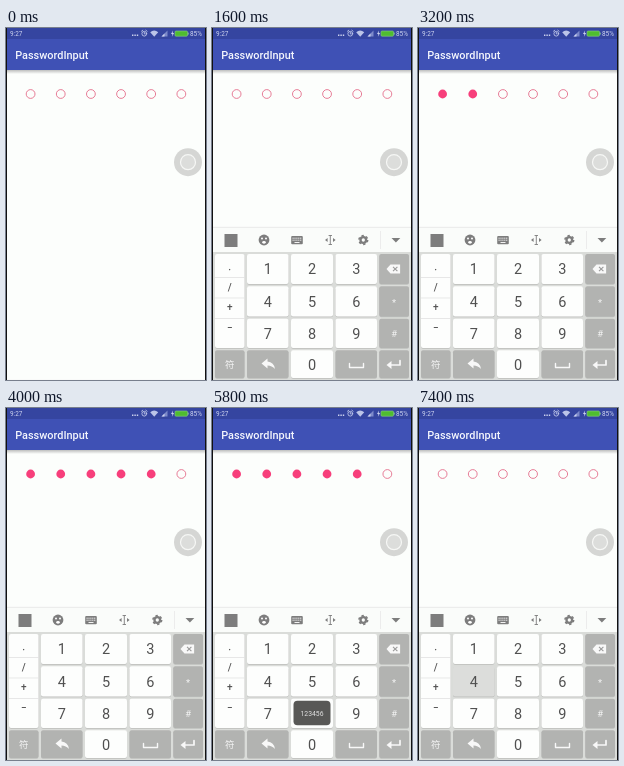
An HTML page that plays this animation: 200x352 px, repeating every 8000 ms.

```html
<!DOCTYPE html>
<html lang="en">
<head>
<meta charset="utf-8">
<title>PasswordInput</title>
<style>
  html, body { margin: 0; width: 100%; height: 100%; overflow: hidden; background: #fcfefc; }
  svg { display: block; width: 100%; height: 100%; }
  text { font-family: Roboto, "Noto Sans CJK SC", "Noto Sans CJK", sans-serif; }
  .digit { font-size: 14.5px; fill: #505050; text-anchor: middle; }
  .sign { font-size: 10px; font-weight: 500; fill: #555; text-anchor: middle; }
  .light { fill: #f4f4f4; text-anchor: middle; font-size: 9.5px; }
  .status { font-size: 6.4px; fill: #ccd2ee; }
  .line { fill: none; stroke-linecap: round; stroke-linejoin: round; }
</style>
</head>
<body>
<svg viewBox="0 0 200 352" preserveAspectRatio="none">
  <defs>
    <linearGradient id="shade" x2="0" y2="1">
      <stop stop-color="#000" stop-opacity=".25"/>
      <stop offset="1" stop-color="#000" stop-opacity="0"/>
    </linearGradient>
  </defs>
  <rect width="200" height="352" fill="#fcfefc"/>
  <rect y="42" width="200" height="4" fill="url(#shade)"/>
  <rect width="200" height="42" fill="#3f51b5"/>
  <rect width="200" height="11" fill="#3545a0"/>
  <text x="9.2" y="30.8" font-size="10.9" font-weight="500" fill="#f4f6fd">PasswordInput</text>

  <g id="status">
    <text class="status" x="4" y="8">9:27</text>
    <text class="status" x="184" y="8">85%</text>
    <path d="M126 7.3h1.4M128.4 7.3h1.4M130.8 7.3h1.4" stroke="#ccd2ee" stroke-width="1.4"/>
    <g class="line" stroke="#bcc5e8" stroke-width=".9">
      <circle cx="138.3" cy="5.7" r="2.4"/>
      <path d="M138.3 4.4v1.5h1M135.5 3.2l1.3-1M141.1 3.2l-1.3-1"/>
    </g>
    <path d="M144.2 4.3q4-3.4 8 0l-4 4.5z" fill="#bcc5e8"/>
    <path d="M161.5 2.5v6h-6z" fill="#7d8aca"/>
    <path d="M158.5 5.5v3h-3z" fill="#ccd2ee"/>
    <path d="M167 2.4l-2 3.5h1.4l-.5 2.8 2.2-3.7h-1.4z" fill="#ccd2ee"/>
    <rect x="169" y="3" width="12.5" height="5.2" rx="1" fill="#4fbd2f" stroke="#8cc98a" stroke-width=".6"/>
    <rect x="181.7" y="4.6" width="1" height="2" fill="#8cc98a"/>
  </g>

  <g id="dots" stroke-width=".9"></g>

  <g id="keyboard">
    <rect y="199" width="200" height="153" fill="#dadcd9"/>
    <rect y="199" width="200" height="25" fill="#fafcfa"/>
    <path d="M0 199.3h200" stroke="#e2e2e2" stroke-width=".7"/>
    <rect x="12.5" y="206" width="13" height="13" fill="#7d7d7d"/>
    <circle cx="52" cy="212" r="5.4" fill="#7d7d7d"/>
    <circle cx="50" cy="210.4" r="1" fill="#fff"/>
    <circle cx="54" cy="210.4" r="1" fill="#fff"/>
    <ellipse cx="52" cy="214.3" rx="1.8" ry="1.4" fill="#fff"/>
    <rect x="79.2" y="208" width="11.6" height="8.2" rx="1" fill="#7d7d7d"/>
    <path d="M80.5 210.2h9M80.5 212.2h9" stroke="#fff" stroke-width=".9" stroke-dasharray="1.2 .7"/>
    <path d="M82.5 214.5h5" stroke="#fff" stroke-width=".9"/>
    <path class="line" d="M118.3 207.7v8.6M117 207.5h2.600M117 216.500h2.600" stroke="#7d7d7d" stroke-width=".9"/>
    <path d="M115.6 210v4l-2.600-2zM121 210v4l2.600-2z" fill="#7d7d7d"/>
    <circle cx="151.3" cy="212" r="4.4" fill="none" stroke="#7d7d7d" stroke-width="1.5" stroke-dasharray="2.3 2.308"/>
    <circle cx="151.3" cy="212" r="2.8" fill="none" stroke="#7d7d7d" stroke-width="2.3"/>
    <path d="M168.5 203v18" stroke="#e6e6e6" stroke-width=".7"/>
    <path d="M179.5 210h8.800l-4.400 4.500z" fill="#7d7d7d"/>
    <g id="keys"></g>
  </g>

  <g id="toast">
    <rect x="81.500" y="292.700" width="37" height="24.600" rx="4" fill="#585856"/>
    <text x="100" y="307.500" font-size="6.8" fill="#e2e2e2" text-anchor="middle">123456</text>
  </g>

  <circle cx="182" cy="134.200" r="14" fill="#d5d6d4"/>
  <circle cx="182" cy="134.200" r="7.500" fill="#dcdddb" stroke="#f6f7f5" stroke-width="1.2"/>
  <path d="M.5 0v352M199.5 0v352" stroke="#111"/>
</svg>
<script>
const LOOP = 8000;
const byId = id => document.getElementById(id);

function add(parent, tag, attrs, text = '') {
  const node = document.createElementNS('http://www.w3.org/2000/svg', tag);
  for (const name in attrs) node.setAttribute(name, attrs[name]);
  node.textContent = text;
  return parent.appendChild(node);
}

// Keys: left and right edges per column, top and bottom edges per row
const columns = [[3, 32.5], [35, 76.5], [79, 121], [123.5, 165], [167.3, 197]];
const rows = [[226, 256], [258.3, 288.5], [290.7, 320], [322.3, 350]];
const GREY = '#b2b3b1';
const PINK = '#f73f7b';
const keys = {};
const board = byId('keys');

function addKey(name, col, row, fill, lastRow = row) {
  const [x, right] = columns[col];
  const y = rows[row][0], bottom = rows[lastRow][1];
  const box = { x, width: right - x, height: bottom - y, rx: 2 };
  add(board, 'rect', { ...box, y: y + 0.7, fill: '#bdbebc' });
  keys[name] = { fill, node: add(board, 'rect', { ...box, y, fill }) };
  return { x: (x + right) / 2, y: (y + bottom) / 2 };
}

function label(text, cls, x, y) {
  add(board, 'text', { class: cls, x, y }, text);
}

function icon(d, stroke = 1.4) {
  add(board, 'path', { d, class: 'line', stroke: '#f8f8f8', 'stroke-width': stroke });
}

for (let n = 0; n <= 9; n++) {
  const [col, row] = n ? [(n - 1) % 3 + 1, Math.floor((n - 1) / 3)] : [2, 3];
  const at = addKey(n, col, row, '#fdfefd');
  label(n, 'digit', at.x, at.y + 5.4);
}

addKey('signs', 0, 0, '#fdfefd', 2);
['·', '/', '+', '−'].forEach((sign, i) => {
  label(sign, 'sign', 17.7, [245.5, 262.5, 283, 302.5][i]);
  if (i) add(board, 'path', { d: `M3 ${229 + 20.5 * i}h29.5`, stroke: '#dedede', 'stroke-width': 0.7 });
});

addKey('delete', 4, 0, GREY);
add(board, 'path', { d: 'M174.5 241l4-4.6h9.6v9.2h-9.6z', fill: '#f8f8f8' });
add(board, 'path', { d: 'M181 238.8l4.4 4.4m0-4.4l-4.4 4.4', stroke: '#999', 'stroke-width': 1.1 });
const star = addKey('*', 4, 1, GREY);
label('*', 'light', star.x, star.y + 5);
const hash = addKey('#', 4, 2, GREY);
label('#', 'light', hash.x, hash.y + 3.5);
const symbols = addKey('symbols', 0, 3, GREY);
label('符', 'light', symbols.x, symbols.y + 4);
addKey('back', 1, 3, GREY);
add(board, 'path', { d: 'M49.5 335.5l6-5v3q6.5 .5 7.5 7.5-3-3.5-7.5-3.5v3z', fill: '#f8f8f8' });
addKey('space', 3, 3, GREY);
icon('M137.5 335.5v4h14v-4');
addKey('enter', 4, 3, GREY);
icon('M188 332.5v4.5h-11', 1.7);
add(board, 'path', { d: 'M179.5 333v8l-5-4z', fill: '#f8f8f8' });

const dots = Array.from({ length: 6 }, (_, i) =>
  add(byId('dots'), 'circle', { cx: 24.6 + 30.15 * i, cy: 66, r: 4.4 }));

// Each step: [start in ms, value]
const slide = [[0, 153], [1000, 90], [1200, 14], [1400, 0]];
const filled = [[0, 0], [2600, 1], [3000, 2], [3400, 3], [3600, 4], [4000, 5], [4600, 6],
  [5400, 5], [6000, 4], [6200, 3], [6600, 2], [6800, 1], [7200, 0]];
const pressed = [[0, null], [2400, 1], [2600, null], [2800, 2], [3000, null], [3400, 3],
  [3600, 4], [3800, 5], [4000, null], [4400, 6], [4600, null], [5000, 'delete'],
  [5600, null], [6000, 'delete'], [6400, null], [6600, 'delete'], [7200, null], [7400, 4]];
const toast = [[0, 0], [4800, 0.6], [5000, 1], [6800, 0.4], [7000, 0]];

const valueAt = (steps, t) => steps.findLast(([start]) => start <= t)[1];

function draw(now) {
  const t = now % LOOP;
  byId('keyboard').setAttribute('transform', `translate(0 ${valueAt(slide, t)})`);
  byId('toast').setAttribute('opacity', valueAt(toast, t));
  const count = valueAt(filled, t);
  dots.forEach((dot, i) => {
    const full = i < count;
    dot.setAttribute('fill', full ? PINK : 'none');
    dot.setAttribute('stroke', full ? 'none' : '#e56f8c');
  });
  const active = valueAt(pressed, t);
  for (const name in keys) {
    const { node, fill } = keys[name];
    const down = fill === GREY ? '#929292' : '#dcdddb';
    node.setAttribute('fill', name === String(active) ? down : fill);
  }
}

const start = performance.now();
function tick() {
  draw(performance.now() - start);
  requestAnimationFrame(tick);
}
tick();
</script>
</body>
</html>
```
